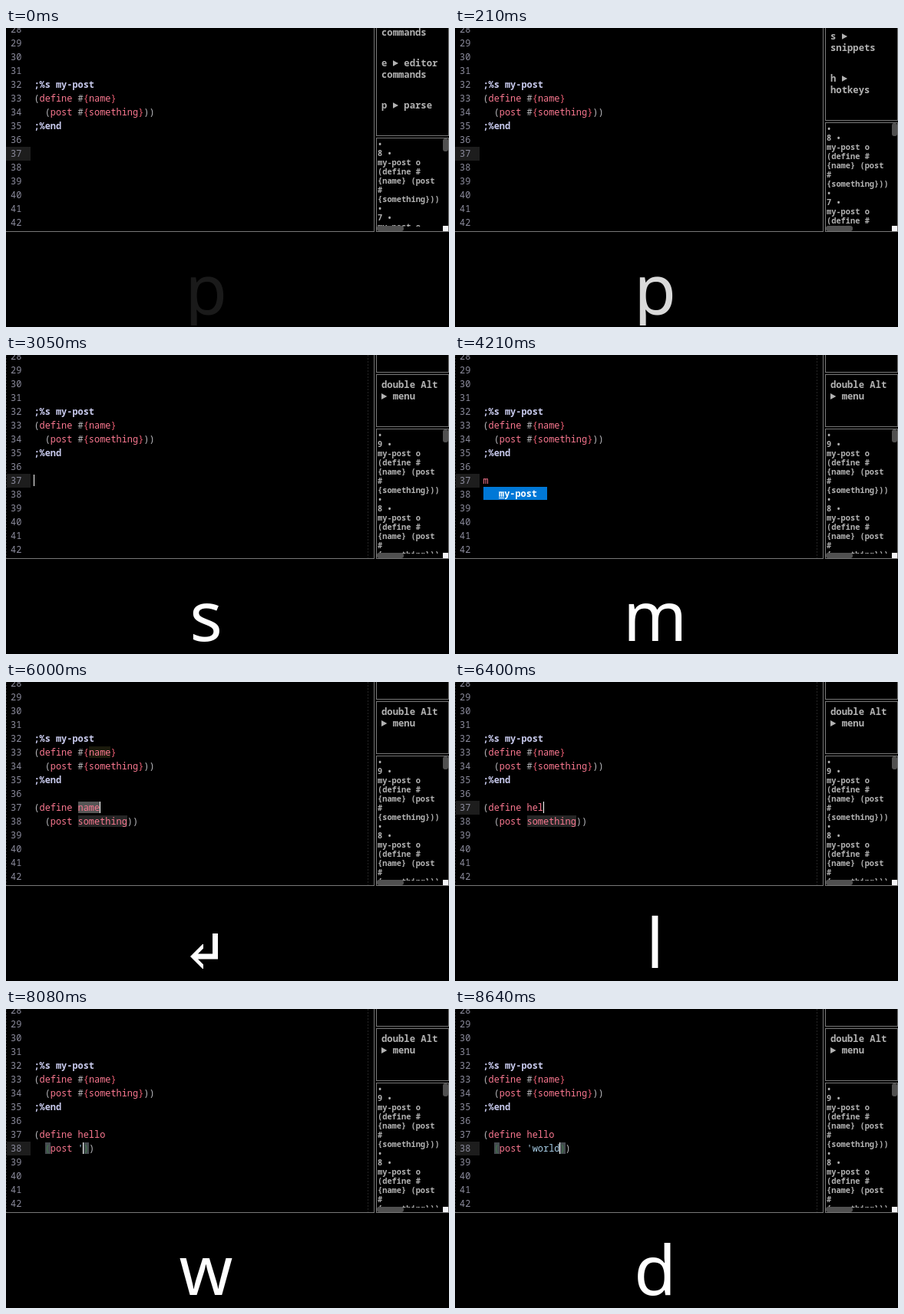
An HTML page that plays this animation: 577x390 px, repeating every 8940 ms.

```html
<!DOCTYPE html>
<html lang="en">
<head>
<meta charset="utf-8">
<title>Snippet demo</title>
<style>
html, body { margin: 0; width: 100%; height: 100%; overflow: hidden; background: #000; }
#stage { position: relative; width: 577px; height: 390px; overflow: hidden; background: #000;
  font-family: "Noto Sans Mono", "DejaVu Sans Mono", monospace; }
#stage div { position: absolute; white-space: pre; box-sizing: border-box; }
#stage svg { position: absolute; left: 0; top: 0; }
#stage .row { margin-top: -1px; font-size: 11.915px; font-weight: 500; line-height: 18px;
  height: 18px; color: #b8b8bc; }
#stage .num { color: #8b8b9c; }
.p { color: #fa7890; }
.r { color: #f05f74; }
.q { color: #a9cfe8; }
.m { color: #3f7a48; }
#stage b { color: #c9cbee; font-weight: 700; }
#stage .panel { left: 482px; width: 95px; border: 1px solid #777; overflow: hidden; }
#stage .menu { left: 489px; margin-top: -1px; font-size: 12.22px; line-height: 15px;
  font-weight: 600; color: #b2b2b2; }
#stage .menu i { display: inline-block; width: 7.33px; height: 8px; background: #b2b2b2;
  clip-path: polygon(0 0, 100% 50%, 0 100%); }
#stage .log { left: 1px; top: 1px; width: 92px; overflow: hidden; font-size: 10.35px;
  line-height: 12px; font-weight: 600; color: #b2b2b2; }
#stage .dash { top: 0; width: 1px; height: 265px;
  background: repeating-linear-gradient(#262626 0 2px, #000 2px 4px); }
#stage .popup { left: 37px; top: 172px; width: 83px; height: 17px; padding-left: 20px;
  background: #0078d7; color: #fff; font-size: 11.915px; font-weight: 700; line-height: 17px; }
</style>
</head>
<body>
<div id="stage"></div>
<script>
const LOOP = 8940, X0 = 36.4, CW = 7.15;
const stage = document.getElementById("stage");
const rowTop = n => 65 + 18 * (n - 32);
const tint = (c, s) => `<span class="${c}">${s}</span>`;
const rect = (x, y, w, h, color, extra = "") =>
  `<div style="left:${x}px;top:${y}px;width:${w}px;height:${h}px;background:${color};${extra}"></div>`;
const mark = (n, col, len, color) =>
  rect(X0 + col * CW, rowTop(n) + 1, len * CW, 15, color);
const line = (n, html) =>
  `<div class="row" style="left:${X0}px;top:${rowTop(n)}px">${html}</div>`;

// Each entry changes the state from its time on.
const steps = [
  [0, { key: "p", menu: 0, focus: false, cur: null, name: null, arg: null, act: 37, field: "" }],
  [50, { menu: 1 }],
  [1120, { key: "s" }],
  [1170, { menu: 2 }],
  [1340, { focus: true }],
  [1870, { cur: [37, 0] }],
  [2470, { cur: null }],
  [3050, { cur: [37, 0] }],
  [3550, { key: "m" }],
  [3630, { popup: true, cur: [37, 1] }],
  [4210, { cur: null }],
  [4380, { key: "enter" }],
  [4460, { popup: false, name: "name", arg: "something", act: 0, field: "name" }],
  [4790, { cur: [37, 12] }],
  [5420, { cur: null }],
  [6000, { cur: [37, 12] }],
  [6080, { key: "h" }],
  [6130, { name: "h", cur: [37, 9], act: 37, field: "typing" }],
  [6210, { key: "e" }],
  [6260, { name: "he", cur: [37, 10] }],
  [6350, { key: "l" }],
  [6400, { name: "hel", cur: [37, 11] }],
  [6570, { name: "hell", cur: [37, 12] }],
  [6740, { key: "o" }],
  [6790, { name: "hello", cur: [37, 13] }],
  [7040, { key: "tab", cur: [38, 17], act: 0, field: "arg" }],
  [7420, { cur: null }],
  [7670, { key: "'" }],
  [7750, { arg: "'", cur: [38, 9], act: 38, field: "" }],
  [8080, { key: "w" }],
  [8150, { arg: "'w", cur: [38, 10] }],
  [8220, { key: "o" }],
  [8290, { arg: "'wo", cur: [38, 11] }],
  [8360, { key: "r" }],
  [8430, { key: "l", arg: "'wor", cur: [38, 12] }],
  [8500, { arg: "'worl", cur: [38, 13] }],
  [8570, { key: "d" }],
  [8640, { arg: "'world", cur: [38, 14] }]
];

const menus = [
  { end: 141, log: 143, top: 8, items: [[-1, "commands"], [39, "e ▶ editor\ncommands"], [94, "p ▶ parse"]] },
  { end: 121, log: 123, top: 8, items: [[4, "s ▶\nsnippets"], [59, "h ▶\nhotkeys"]] },
  { end: 94, start: 25, log: 96, top: 9, items: [[32, "double Alt\n▶ menu"]] }
];

const icons = {
  enter: "M269 328h7v33.5H250L257 368.5V374H256L240 358L256 342H257V347.5L250 354.5H269z",
  tab: "M228 311h6v31h-6zM293 323v6H245L252 341H248L235 326L248 311H252L245 323z" +
    "M286 342h7v31h-7zM228 354v6H276L269 372H273L286 357L273 342H269L276 354z"
};

function rightSide(i) {
  const m = menus[i], start = m.start ?? -5;
  let out = "";
  if (m.start) out += `<div class="panel" style="top:-5px;height:28px"></div>`;
  out += `<div class="panel" style="top:${start}px;height:${m.end - start}px"></div>`;
  for (const [y, s] of m.items)
    out += `<div class="menu" style="top:${y}px">${s.replace("▶", "<i></i>")}</div>`;
  const entry = n => `•\n${n} •\nmy-post o\n(define #\n{name} (post\n#\n{something}))\n`;
  out += `<div class="panel" style="top:${m.log}px;height:${266 - m.log}px">` +
    `<div class="log" style="height:${257 - m.log}px">${entry(m.top)}${entry(m.top - 1)}</div></div>`;
  return out + rect(569, m.log + 1, 7, 17, "#505050", "border-radius:3px") +
    rect(483, 258, 35, 7, "#505050", "border-radius:3px") + rect(569, 258, 7, 7, "#f4f4f8");
}

function code(s) {
  let out = s.act ? rect(0, rowTop(s.act), 32, 18, "#1d1d1d") : "";
  for (let n = 28; n < 43; n++)
    out += `<div class="row num" style="left:6px;top:${rowTop(n)}px">${n}</div>`;

  if (s.field === "name") out += mark(33, 10, 4, "#1b1a0c") + mark(37, 8, 4, "#565656");
  if (s.field === "name" || s.field === "typing") out += mark(38, 8, 9, "#262626");
  if (s.field === "arg") out += mark(34, 10, 9, "#101c0c") + mark(38, 8, 9, "#484848");

  const hole = w => "#" + tint("r", "{") + tint("p", w) + tint("r", "}");
  out += line(32, "<b>;%s my-post</b>") +
    line(33, "(" + tint("p", "define") + " " + hole("name")) +
    line(34, "  (" + tint("p", "post") + " " + hole("something") + "))") +
    line(35, "<b>;%end</b>");

  if (s.popup)
    out += line(37, tint("p", "m")) + `<div class="popup"><u>m</u>y-post</div>`;
  if (s.name) {
    const quoted = s.arg[0] === "'";
    if (quoted) out += mark(38, 2, 1, "#454b50") + mark(38, 8 + s.arg.length, 1, "#454b50");
    const [open, close] = quoted ? [tint("m", "("), tint("m", ")")] : ["(", ")"];
    out += line(37, "(" + tint("p", "define") + " " + tint("p", s.name)) +
      line(38, "  " + open + tint("p", "post") + " " + tint(quoted ? "q" : "p", s.arg) + close + ")");
  }
  if (s.cur) out += rect(Math.floor(X0 + s.cur[1] * CW), rowTop(s.cur[0]) + 1, 1, 15, "#fff");
  return out;
}

function keyView(k) {
  const body = icons[k] ? `<path d="${icons[k]}"/>`
    : `<text x="260.5" y="373" text-anchor="middle" font-size="89" font-weight="500" font-family="Noto Sans, Open Sans, sans-serif">${k}</text>`;
  return `<svg id="key" width="577" height="388" fill="#fff">${body}</svg>`;
}

function draw(s) {
  stage.innerHTML =
    `<div style="left:-5px;top:-5px;width:485px;height:271px;border:1px solid #777"></div>` +
    code(s) +
    (s.focus ? `<div class="dash" style="left:0"></div><div class="dash" style="left:471px"></div>` : "") +
    rightSide(s.menu) + keyView(s.key);
}

let last = -1;
function tick() {
  const t = performance.now() % LOOP;
  const n = steps.filter(e => e[0] <= t).length;
  if (n !== last) {
    draw(Object.assign({}, ...steps.slice(0, n).map(e => e[1])));
    last = n;
  }
  const fade = Math.floor(t / 40) * 40 / 240;
  document.getElementById("key").style.opacity = Math.min(1, 0.1 + 0.9 * fade);
  requestAnimationFrame(tick);
}
tick();
</script>
</body>
</html>
```
